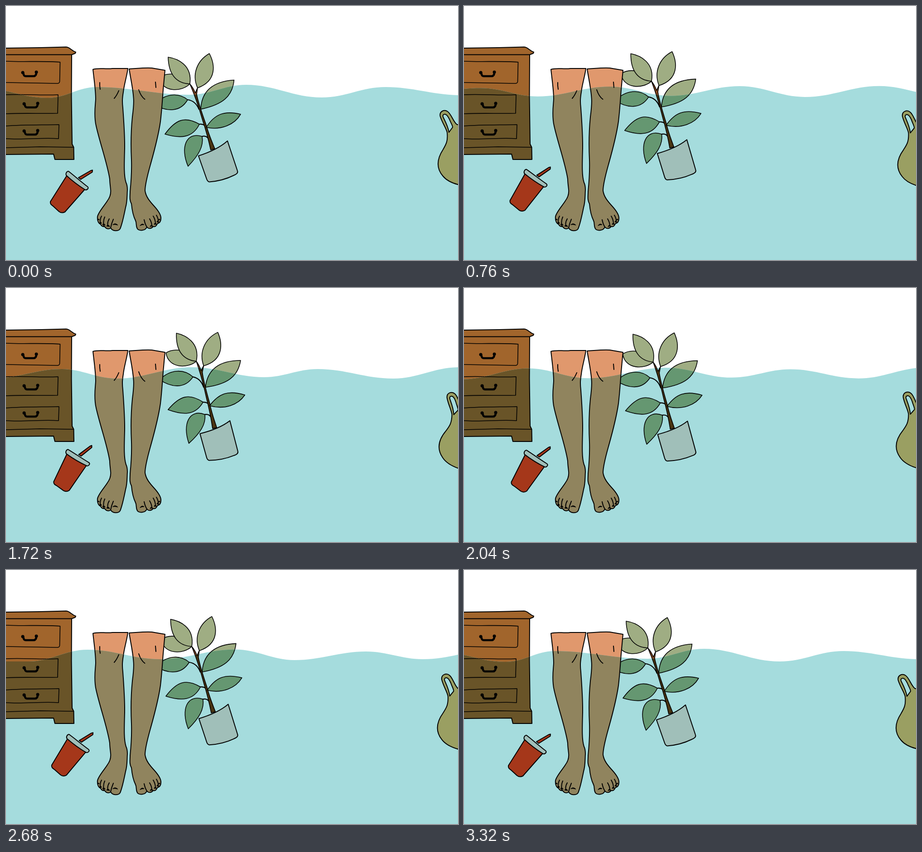
These frames come from a looping animation (998 px wide and 561 px high, 3.36 s). An HTML page with a canvas:

```html
<!DOCTYPE html>
<html lang="en">
<head>
<meta charset="utf-8">
<title>Flooded room</title>
<style>
html, body { margin: 0; width: 100%; height: 100%; overflow: hidden; background: #fff; }
canvas { display: block; }
</style>
</head>
<body>
<canvas id="stage" width="998" height="561"></canvas>
<script>
const ctx = document.getElementById('stage').getContext('2d');
const LOOP = 3360, STEP = 40, CYCLE = 3320;
const TIMES = [0, 440, 1080, 1720, 2360, 2680];
const BOLD = 2, FINE = 1.6;

// Colours as [above water, under water]
const WOOD = ['#a1652c', '#695428'], SKIN = ['#e0986d', '#90845e'],
  LEAF = ['#9fad83', '#659771'], STEM = ['#8b4a20', '#4a3512'],
  POT = ['#a0bfb9', '#a0bfb9'], RED = ['#a5371a', '#a5371a'], OLIVE = ['#9a9f62', '#9a9f62'];
const WATER = '#a5dcdd';

// Each crest drifts one wavelength per cycle and then takes the next one's place.
const crestX = [-60, 12, 58, 123, 158, 180, 200, 277, 360, 410, 482, 506, 530,
  575, 640, 688, 757, 795, 838, 892, 940, 1000, 1040, 1080, 1130];
const crestY = [180, 181, 181, 179, 176, 176, 179, 178, 178, 175, 177, 175.5, 174,
  177, 177, 179, 180, 180, 179, 178, 175.5, 175, 176, 176, 177];
const troughX = [-190, -160, -110, -30, 20, 50, 92, 130, 195, 245, 305, 340, 405, 440, 478,
  570, 607, 637, 697, 727, 782, 855, 885, 920, 1005, 1040, 1090, 1150, 1180, 1220, 1260];
const troughY = [198, 198, 198, 200, 203, 202, 203, 202, 198, 200, 198, 197, 196, 198, 198.5,
  197, 199, 199, 202, 202, 200, 200, 199, 197, 197, 199, 199, 198, 198, 198, 198];

const keyTime = i => TIMES[(i + 6) % 6] + CYCLE * Math.floor(i / 6);

// Smooth curve through the keys; value(i) gives key number i
function smooth(t, value) {
  let i = 5;
  while (TIMES[i] > t) i--;
  const span = keyTime(i + 1) - keyTime(i), u = (t - keyTime(i)) / span;
  const slope = j => (value(j + 1) - value(j - 1)) / (keyTime(j + 1) - keyTime(j - 1)) * span;
  const a = value(i), b = value(i + 1), u2 = u * u, u3 = u2 * u;
  return a + (b - a) * (3 * u2 - 2 * u3) + slope(i) * (u3 - 2 * u2 + u) + slope(i + 1) * (u3 - u2);
}
const cycle = (t, keys) => smooth(t, i => keys[(i + 6) % 6]);
const drift = (t, list, k) =>
  smooth(t, i => list[Math.max(0, Math.min(list.length - 1, 6 * k + i))]);

function waterPath(t) {
  const pts = [];
  for (let k = 0; k < 5; k++) {
    pts.push([drift(t, troughX, k), drift(t, troughY, k)]);
    if (k < 4) pts.push([drift(t, crestX, k), drift(t, crestY, k)]);
  }
  const p = new Path2D();
  p.moveTo(-300, 570);
  p.lineTo(-300, pts[0][1]);
  p.lineTo(...pts[0]);
  for (let i = 1; i < pts.length; i++) {
    const [x0, y0] = pts[i - 1], [x1, y1] = pts[i], h = (x1 - x0) * 0.38;
    p.bezierCurveTo(x0 + h, y0, x1 - h, y1, x1, y1);
  }
  p.lineTo(1300, 570);
  return p;
}

const paths = list => list.map(d => new Path2D(d));

const dresser = paths([
  'M-5 106 L145 107 L144.5 200 L146 305 L149.5 312 L150 339 L108 339 L105 327 L-5 328Z',
  'M-5 93 L75 92 L133 90.5 C141 91 144 98 154 102 L153 104.5 L145 107.5 L-5 107.5Z']);
const dresserLines = new Path2D(
  'M0 122 C40 124 80 121 119.5 124 L118.5 167 Q118 171 113 171 L0 169' +
  'M0 196 C40 194 75 198 115 196 L114 237 C75 238 40 236 0 238' +
  'M0 265 C40 262 80 263 117 262 L116 293 C80 290 40 296 0 293' +
  'M0 313 L75 311 L149 312');
const handle = new Path2D('M38 147 q1 8 5 8 h18 q6 0 6 -9');
const knobs = new Path2D('M33.5 147 a3.5 3.5 0 1 0 7 0 a3.5 3.5 0 1 0 -7 0M63.5 146 a3.5 3.5 0 1 0 7 0 a3.5 3.5 0 1 0 -7 0');

const legs = paths([
  'M192 140 C205 136 220 140 235 138 L269 138 C267 155 261 172 259 190 ' +
  'C256.5 205 256.5 212 258 225 C260 255 262.5 285 262 315 C261 350 260 375 265 390 ' +
  'C268 396 268 400 268 406 ' +
  'C267 420 268 432 264 445 C260 465 257 480 252 492 C248 498 235 498 231 490 ' +
  'C227 494 220 492 218 487 C214 488 210 486 209 482 C205 481 201 475 202 465 ' +
  'C204 455 218 440 224 430 C230 422 232 414 231 405 C230 395 229 390 229 382 ' +
  'C223 345 208 305 199 265 C193 240 198 215 198 205 C198 185 194 160 192 140Z',
  'M272 139 C290 138 305 136 322 137 L351 142 L347 185 C345 210 344 230 341 255 ' +
  'C336 290 326 325 319 350 C312 375 307 395 307 408 C309 422 318 432 328 443 ' +
  'C336 452 343 462 342 470 C342 477 337 480 334 481 C332 487 328 488 325 487 ' +
  'C320 493 314 492 311 488 C308 497 294 497 290 492 C286 485 289 480 286 474 ' +
  'C280 462 278 448 277 437 C272 428 274 420 274 410 C276 390 278 370 277 340 ' +
  'C275.5 310 276 275 279 245 C281 230 283 215 281.5 202 C280 180 275 160 272 139Z']);
const legLines = new Path2D(
  'M207 169 Q206.5 176 208 184M249 187 Q245 197 239 204M330 168 L331 180M293 185 Q298 200 306.5 206' +
  'M211 464 Q207 471 208 481M218 466 Q214 474 216 486M228 470 Q223 478 225 486M237 471 Q233 480 231 490' +
  'M305 472 Q307 482 311 488M317 470 Q322 478 322 486M325 464 Q330 472 330 481M332 462 Q337 470 336 478');
const nails = new Path2D(
  'M236 483 Q241 478 247 484 Q241 482 236 483ZM222 486 Q226 481 229 487ZM213 483 Q216 478 219 484Z' +
  'M207 479 Q209 474 211 480ZM203 472 Q204 468 206 472Z' +
  'M296 485 Q300 479 305 483 Q300 483 296 485ZM318 487 Q321 481 324 486ZM327 482 Q330 476 332 482Z' +
  'M333 477 Q335 472 337 476ZM337 472 Q339 468 340 472Z');

const pot = new Path2D('M425 331 C450 323 472 313 489 298 L511 364 C513 369 508 372 503 374 ' +
  'C485 383 468 387 449 388.5 C446 388 444 385 443 382Z');
const stem = new Path2D('M452 318 C447 295 440 270 434 252 C430 238 422 210 406 172 ' +
  'C413 180 416 187 418 192 L423 180 L421 195 C424 212 432 235 442 263 C448 285 455 300 461 315Z');
const twigs = new Path2D('M401 207 Q418 209 426 228M427 261 Q438 260 442 268M433 288 Q444 285 449 297');
const leaves = paths([
  'M406 172 C388 190 345 192 338 158 C355 146 385 146 406 172Z',
  'M358 113 C378 116 412 130 406 172 C375 171 359 150 358 113Z',
  'M449 105 C421 121 410 152 423 181 C467 165 461 128 449 105Z',
  'M503.5 163.5 C468 166 432 180 430 228 C478 218 500 200 503.5 163.5Z',
  'M401 207 C380 190 350 193 328 218 C355 234 385 235 401 207Z',
  'M442 268 C460 240 480 230 518 239 C505 262 475 275 442 268Z',
  'M427 261 C395 243 375 250 351 283 C385 293 412 292 427 261Z']);
const lowLeaf = new Path2D('M433 288 C398 277 384 312 402 354 C425 330 437 310 433 288Z');

const straw = new Path2D('M160 379 L187 363.5 L191 362.5 L190.5 367 L165 383Z');
const cup = new Path2D('M134 375 L98 432 C97 437 100 439 104 442 L117 454 C122 458 126 457 130 455 L174 405Z');
const lid = new Path2D('M138 365 C134 365 131 370 133 374 C146 386 162 398 175 406 ' +
  'C179 407 184 402 180 399 C167 389 152 376 138 365Z');

const bag = new Path2D('M1060 262 L996 262 C988 257 983 238 975 233 C968 228 957 232 958.5 243 ' +
  'C963 258 971 268 974 279 C976 298 972 305 965 317 C950 340 951 360 965 376 C975 388 990 393 1005 396 L1060 400Z' +
  'M969 239 C965 239 963.5 242 965.5 246 C970 255 976 266 978 279 L986 268 C987 265 982 258 979 250 C976 244 973 239 969 239Z');

// Draws something moved by (dx, dy) and turned about (x, y)
function swing(x, y, dx, dy, degrees, draw) {
  ctx.save();
  ctx.translate(x + dx, y + dy);
  ctx.rotate(degrees * Math.PI / 180);
  ctx.translate(-x, -y);
  draw();
  ctx.restore();
}

function line(path, width = BOLD) {
  ctx.lineWidth = width;
  ctx.stroke(path);
}

function scene(t, wet) {
  const shape = (path, colour, width) => {
    ctx.fillStyle = colour[wet];
    ctx.fill(path, 'evenodd');
    line(path, width);
  };
  ctx.strokeStyle = '#000';
  ctx.lineJoin = ctx.lineCap = 'round';

  dresser.forEach(p => shape(p, WOOD));
  line(dresserLines, FINE);
  ctx.fillStyle = '#000';
  for (const [x, y] of [[0, 0], [3, 69], [3, 129]]) {
    ctx.save();
    ctx.translate(x, y);
    line(handle, 4.5);
    ctx.fill(knobs);
    ctx.restore();
  }

  const sway = cycle(t, [0, 0.27, 0.83, 1, 0.56, 0.3]);
  swing(511, 368, 0.6 * sway, -3.5 * sway, 3.9 * sway, () => {
    line(twigs, 2.2);
    shape(stem, STEM, FINE);
    leaves.forEach(p => shape(p, LEAF, FINE));
    shape(pot, POT);
    shape(lowLeaf, LEAF, FINE);
  });

  legs.forEach(p => shape(p, SKIN));
  line(legLines);
  ctx.fillStyle = '#000';
  ctx.fill(nails);
  line(nails, 1);

  swing(139.5, 417.5, cycle(t, [0, 1.5, 3.75, 5.25, 4, 2.5]), cycle(t, [0, -2, -6.5, -9, -4.5, -2]),
    cycle(t, [0, -1.35, -4.6, -6.8, -3.4, -1.4]), () => {
      shape(straw, RED);
      shape(cup, RED);
      shape(lid, POT);
    });

  swing(955, 352, cycle(t, [0, 3, 3.5, 2, -1.5, -1.5]), cycle(t, [0, 0.7, -1, -2.5, -3, -1.7]),
    cycle(t, [0, 1.4, 4.7, 6.9, 4, 2.6]), () => shape(bag, OLIVE));
}

function draw(t) {
  ctx.fillStyle = '#fff';
  ctx.fillRect(0, 0, 998, 561);
  scene(t, 0);
  ctx.save();
  ctx.clip(waterPath(t));
  ctx.fillStyle = WATER;
  ctx.fillRect(0, 0, 998, 561);
  scene(t, 1);
  ctx.restore();
}

const start = performance.now();
function tick() {
  const time = (performance.now() - start) % LOOP;
  draw(Math.floor(time / STEP) * STEP % CYCLE);
  requestAnimationFrame(tick);
}
tick();
</script>
</body>
</html>
```
